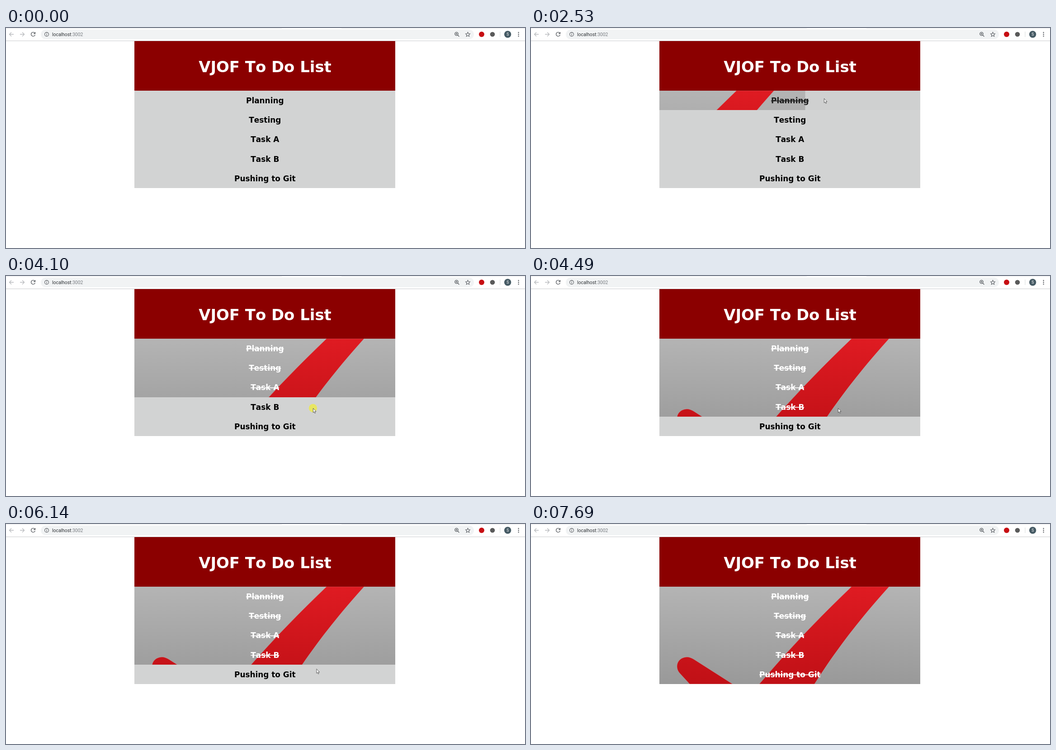
Recreate the animation shown at these times as an HTML page. Size 1148 px wide and 488 px high, loop 9.56 s.

```html
<!DOCTYPE html>
<html lang="en">
<head>
<meta charset="utf-8">
<title>To Do List</title>
<style>
  html, body { margin: 0; width: 100%; height: 100%; overflow: hidden; background: #fff; }
  svg { display: block; }
  .list { font: bold 16.9px "DejaVu Sans", sans-serif; text-anchor: middle; font-kerning: none; }
  .list .title { font-size: 33.9px; fill: #fff; }
  .url { font: 10.4px Roboto, sans-serif; fill: #2f3337; }
  .icon { fill: none; stroke: #55595e; stroke-width: 1.3; }
</style>
</head>
<body>
<svg id="stage" width="1148" height="488" viewBox="0 0 1148 488">
  <defs>
    <linearGradient id="grey" gradientUnits="userSpaceOnUse" x1="0" y1="139" x2="0" y2="355">
      <stop stop-color="#b4b4b4"/><stop offset="1" stop-color="#999"/>
    </linearGradient>
    <linearGradient id="red" gradientUnits="userSpaceOnUse" x1="0" y1="139" x2="0" y2="355">
      <stop stop-color="#df1b22"/><stop offset="1" stop-color="#c01016"/>
    </linearGradient>
    <g id="picture">
      <path d="M284 139H861V355H284Z" fill="url(#grey)"/>
      <path d="M709 139Q596 247 505 355H627Q694.5 247 792 139Z
               M351 355L329 331C317 318 323 296 345 295C350 295 355 297 360 300L446 355Z"
            fill="url(#red)" stroke="#c49a9a" stroke-opacity=".5"/>
    </g>
  </defs>

  <!-- browser toolbar -->
  <path d="M0 0H610V1H0ZM742 0H1148V1H742Z" fill="#e6e8ea"/>
  <path d="M0 28H1148V29H0Z" fill="#c9cbcd"/>
  <rect x="77" y="3.5" width="958" height="21.5" rx="10.7" fill="#f1f3f4"/>
  <g class="icon">
    <path d="M17 14H7.5M12 9.5L7.5 14L12 18.5M31 14H40.5M36 9.5L40.5 14L36 18.5" stroke="#b9bbbe"/>
    <path d="M63.5 11A4.5 4.5 0 1 0 64.3 15.2M64.5 9V12.5H61"/>
    <circle cx="90" cy="14" r="4.4" stroke-width="1.1"/>
    <path d="M90 13.5V16.5M90 11.3V12.5" stroke-width="1.1"/>
    <circle cx="996.5" cy="13" r="3.6"/>
    <path d="M999 15.7L1002.5 19M994.8 13H998.2M996.5 11.3V14.7"/>
    <path d="M1021.5 9.3L1022.9 12.6 1026.4 12.9 1023.8 15.2 1024.6 18.7 1021.5 16.8 1018.4 18.7 1019.2 15.2 1016.6 12.9 1020.1 12.6Z" stroke-width="1.1"/>
  </g>
  <text class="url" x="102" y="18">localhost<tspan fill="#777b80">:3002</tspan></text>
  <circle cx="1052" cy="14" r="6" fill="#c70d12"/>
  <circle cx="1076" cy="14" r="5.3" fill="#5a5a5a"/>
  <path d="M1092.5 8H1093.5V20H1092.5Z" fill="#d8dadc"/>
  <circle cx="1109.7" cy="14" r="7.7" fill="#455a64"/>
  <text x="1109.7" y="17" font-family="Roboto, sans-serif" font-size="8.5" text-anchor="middle" fill="#fff">S</text>
  <path d="M1133.7 10v0M1133.7 14v0M1133.7 18v0" stroke="#55595e" stroke-width="2.4" stroke-linecap="round"/>

  <!-- page -->
  <g class="list" id="list">
    <path d="M284 29H861V139H284Z" fill="#8b0000"/>
    <text class="title" x="573" y="98">VJOF To Do List</text>
  </g>
  <g id="pointer">
    <circle id="press" r="9.2" fill="#e8e662"/>
    <path d="M.4 .4V10L2.5 8.1 4 11.5 5.6 10.8 4.1 7.5H7Z" fill="#fff" stroke="#444" stroke-width=".85"/>
  </g>
</svg>
<script>
const LOOP = 9560, STEP = 78, START = 1290; // the screen refreshes every STEP ms
const FADE = 350, HOLD = 140, PAUSE = 60;   // colour change, button held, rest after a click
const LEFT = 284, TOP = 139, WIDTH = 577, ROW = 43.2;

// Where each task is clicked and when; every click ticks or unticks it.
const tasks = [
  { name: "Planning", x: 648, y: 156, clicks: [2498] },
  { name: "Testing", x: 658, y: 202, clicks: [2955] },
  { name: "Task A", x: 672, y: 265, clicks: [3605] },
  { name: "Task B", x: 679, y: 293, clicks: [4145, 5110, 5730] },
  { name: "Pushing to Git", x: 690, y: 334, clicks: [6420] }
];

// The pointer comes in, rests on each task while it is clicked, and goes out.
const stop = (time, x, y) => ({ time, x, y });
const path = [
  stop(START, 802, 343), stop(1680, 579, 118), stop(2060, 648, 156),
  ...tasks.flatMap(({ x, y, clicks }) => [stop(clicks[0] - HOLD, x, y), stop(clicks.at(-1) + PAUSE, x, y)]),
  stop(7500, 690, 332), stop(7620, 700, 422)
];

const $ = id => document.getElementById(id);
const mix = (a, b, p) => a + (b - a) * p;

function add(parent, tag, attrs) {
  const node = document.createElementNS("http://www.w3.org/2000/svg", tag);
  for (const key in attrs) node.setAttribute(key, attrs[key]);
  return parent.appendChild(node);
}

const rows = tasks.map(({ name, clicks }, i) => {
  const y = Math.round(TOP + ROW * i), height = Math.round(TOP + ROW * (i + 1)) - y;
  const box = { x: LEFT, y, width: WIDTH, height };
  const view = add($("list"), "svg", { ...box, viewBox: `${LEFT} ${y} ${WIDTH} ${height}` });
  const back = add(view, "rect", box);
  const picture = add(view, "use", { href: "#picture" });
  const label = add(view, "text", { x: 572.8, y: 167 + ROW * i });
  label.textContent = name;
  return { clicks, back, picture, label };
});

// The CSS "ease" curve, cubic-bezier(.25, .1, .25, 1).
function ease(x) {
  if (x >= 1) return 1;
  let low = 0, high = 1, s;
  for (let i = 0; i < 20; i++) {
    s = (low + high) / 2;
    if (.75 * s * (1 - s) + s ** 3 < x) low = s; else high = s;
  }
  return .3 * s * (1 - s) ** 2 + 3 * (1 - s) * s * s + s ** 3;
}

function drawRow({ clicks, back, picture, label }, t) {
  const past = clicks.filter(time => time <= t);
  const done = past.length % 2 === 1;
  const p = past.length ? ease((t - past.at(-1)) / FADE) : 1;
  const level = done ? p : past.length ? 1 - p : 0;
  const shade = mix(211, 185, level), ink = 255 * level;
  back.setAttribute("fill", `rgb(${shade - 1},${shade},${shade})`);
  picture.setAttribute("visibility", done ? "visible" : "hidden");
  picture.setAttribute("x", -WIDTH / 2 * (1 - p));
  label.setAttribute("fill", `rgb(${ink},${ink},${ink})`);
  label.setAttribute("text-decoration", done ? "line-through" : "none");
}

function drawPointer(t) {
  const next = path.findIndex(({ time }) => time > t);
  const visible = next > 0;
  $("pointer").setAttribute("display", visible ? "inline" : "none");
  if (!visible) return;
  const a = path[next - 1], b = path[next];
  const p = (t - a.time) / (b.time - a.time);
  $("pointer").setAttribute("transform", `translate(${mix(a.x, b.x, p)} ${mix(a.y, b.y, p)})`);
  const pressed = tasks.some(({ clicks }) => clicks.some(time => t >= time - HOLD && t < time));
  $("press").setAttribute("display", pressed ? "inline" : "none");
}

function frame() {
  const now = performance.now() % LOOP;
  const t = START + STEP * Math.floor((now - START) / STEP + .25);
  rows.forEach(row => drawRow(row, t));
  drawPointer(t);
  requestAnimationFrame(frame);
}
frame();
</script>
</body>
</html>
```
